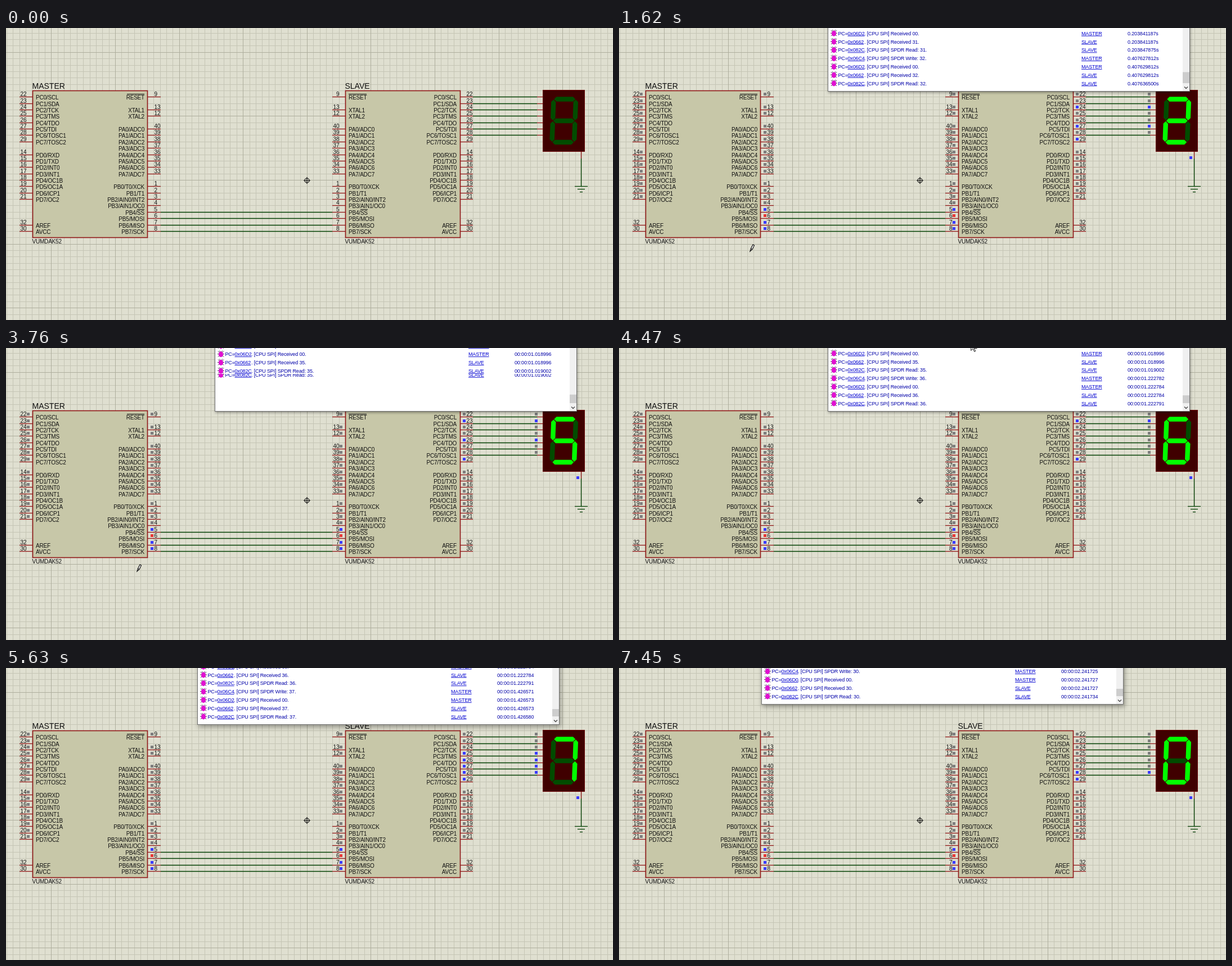
Recreate the animation shown at these times as an HTML page. Size 1079 by 519 pixels, loop 7.71 s.

```html
<!DOCTYPE html>
<html lang="en">
<head>
<meta charset="utf-8">
<title>SPI master and slave</title>
<style>
  html, body { margin: 0; width: 100%; height: 100%; overflow: hidden; background: #dfdfd0; }
  svg { display: block; }
  text { font-family: "Liberation Sans", Arial, sans-serif; font-size: 10px; letter-spacing: -.2px; fill: #111; }
  .num { letter-spacing: 0; }
  .name { font-size: 14px; letter-spacing: 0; }
  #log text { font-size: 9px; letter-spacing: -.15px; fill: #0000a8; }
  #log .link { fill: #0000d0; text-decoration: underline; }
  .crisp { shape-rendering: crispEdges; }
</style>
</head>
<body>
<svg id="stage" width="1079" height="519" viewBox="0 0 1079 519">
  <g id="grid" class="crisp"></g>
  <g id="board"></g>
  <g id="probes" class="crisp"></g>
  <g id="win">
    <rect id="frame" x="371.5" y="-200.5" width="643" height="313" fill="#fff" stroke="#6c6c6c"/>
    <g id="log"></g>
    <rect x="1002" y="-200" width="12" height="312" fill="#f0f0f0"/>
    <rect id="thumb" x="1002" width="12" fill="#cdcdcd"/>
    <path d="M1005 104.500l3 3 3-3" fill="none" stroke="#505050" stroke-width="1.500"/>
  </g>
  <g id="cursor">
    <path id="pencil" d="M0 0l1.500-5L5-12l2.500 1.300L4-3.500z M1.500-5L4-3.500" fill="#fff" stroke="#111" stroke-width="1.200"/>
    <path id="arrow" d="M0 0v15l3.500-3.500 2.500 5.500 2-1-2.500-5h5z" fill="#fff" stroke="#111"/>
  </g>
</svg>
<script>
const LOOP = 7710;
const RED = '#8f1616', GREEN = '#003f00';
const GRAY = '#7e7e7e', BLUE = '#3c3cff', HIGH = '#e83838';
const $ = id => document.getElementById(id);

function add(parent, tag, attrs, text) {
  const el = document.createElementNS('http://www.w3.org/2000/svg', tag);
  for (const k in attrs) el.setAttribute(k, attrs[k]);
  if (text !== undefined) el.textContent = text;
  parent.appendChild(el);
  return el;
}
const board = $('board');
const line = (x1, y1, x2, y2, stroke, w = 1.3, parent = board) =>
  add(parent, 'line', { x1, y1, x2, y2, stroke, 'stroke-width': w });
const label = (x, y, s, anchor = 'start', cls = '') =>
  add(board, 'text', { x, y, 'text-anchor': anchor, class: cls }, s);
const probe = (x, y, fill = GRAY) =>
  add($('probes'), 'rect', { x: x - 2.5, y: y - 2.5, width: 5, height: 5, fill });

// Grid around the origin mark; pin rows sit on its lines
const OX = 535, OY = 271, PITCH = 11.36;
const gridX = i => Math.floor(OX + .3 + i * PITCH) + .5;
const gridY = i => Math.floor(OY - .5 + i * PITCH) + .5;
const rowY = r => gridY(r - 13);
for (const major of [false, true]) {
  for (let i = -50; i <= 50; i++) {
    if ((i % 10 === 0) !== major) continue;
    const c = major ? '#aeae9d' : '#c5c5b5';
    line(gridX(i), 0, gridX(i), 519, c, 1, $('grid'));
    line(0, gridY(i), 1079, gridY(i), c, 1, $('grid'));
  }
}
add(board, 'path', {
  d: `M${OX - 6} ${OY}h12M${OX} ${OY - 6}v12M${OX - 4} ${OY}a4 4 0 1 0 8 0a4 4 0 1 0-8 0`,
  fill: 'none', stroke: '#111', 'stroke-width': 1.2
});

// Pins: [row, number, label]
const portC = ['SCL', 'SDA', 'TCK', 'TMS', 'TDO', 'TDI', 'TOSC1', 'TOSC2'];
const portD = ['RXD', 'TXD', 'INT0', 'INT1', 'OC1B', 'OC1A', 'ICP1', 'OC2'];
const portB = ['T0/XCK', 'T1', 'AIN0/INT2', 'AIN1/OC0', 'SS', 'MOSI', 'MISO', 'SCK'];
const sideCD = [
  ...portC.map((s, i) => [i, 22 + i, `PC${i}/${s}`]),
  ...portD.map((s, i) => [9 + i, 14 + i, `PD${i}/${s}`]),
  [20, 32, 'AREF'], [21, 30, 'AVCC']
];
const sideAB = [
  [0, 9, 'RESET'], [2, 13, 'XTAL1'], [3, 12, 'XTAL2'],
  ...portC.map((_, i) => [5 + i, 40 - i, `PA${i}/ADC${i}`]),
  ...portB.map((s, i) => [14 + i, 1 + i, `PB${i}/${s}`])
];
const bus = { 18: BLUE, 19: HIGH, 20: BLUE, 21: BLUE };
const misoProbes = [], outProbes = portC.map(() => []);

function pins(list, x, dir, isPortC) {
  for (const [r, n, s] of list) {
    const y = rowY(r), left = dir < 0;
    line(x, y, x + 23 * dir, y, RED);
    label(left ? x - 10.5 : x + 11.5, y - 1.5, n, left ? 'end' : 'start', 'num');
    label(left ? x + 6 : x - 6, y + 4, s, left ? 'start' : 'end');
    if (s[0] === 'A') continue;
    const p = probe(x + 7.5 * dir, y - 5, (list === sideAB && bus[r]) || GRAY);
    if (list === sideAB && r === 20) misoProbes.push(p);
    if (isPortC && r < 8) outProbes[r].push(p);
  }
}
function chip(x, name) {
  add(board, 'rect', { x: x + .5, y: 111.5, width: 204, height: 261, fill: '#c7c7a8', stroke: RED, 'stroke-width': 1.6 });
  label(x - .5, 108, name, 'start', 'name');
  label(x - .5, 382.5, 'VUMDAK52');
}
chip(47, 'MASTER');
pins(sideCD, 47, -1, false);
pins(sideAB, 252, 1, false);
line(215, 117.5, 246, 117.5, '#111', 1);
line(233, 322.5, 246, 322.5, '#111', 1);
chip(603, 'SLAVE');
pins(sideAB, 603, -1, false);
pins(sideCD, 807, 1, true);
line(609, 117.5, 641, 117.5, '#111', 1);
line(630, 322.5, 643, 322.5, '#111', 1);

// Wires
for (let r = 18; r < 22; r++) line(275, rowY(r), 580, rowY(r), GREEN);
for (let r = 0; r < 7; r++) {
  const y = rowY(r);
  line(830, y, 944, y, GREEN);
  line(944, y, 955, y, RED);
  outProbes[r].push(probe(942.5, y - 5));
}
line(1022.5, 220, 1022.5, 232, RED);
line(1022.5, 232, 1022.5, 282, GREEN);
line(1011, 281.5, 1034, 281.5, GREEN);
line(1016, 286.5, 1029, 286.5, GREEN);
line(1020, 291.5, 1025, 291.5, GREEN);
probe(1016.5, 230.5, BLUE);

// Seven segment display, segments a to g
add(board, 'rect', { x: 954.5, y: 110.5, width: 74, height: 109, fill: '#400000', stroke: '#6a0808' });
const TL = [973.5, 126.5], TR = [1013, 126.5], ML = [972, 165], MR = [1011.5, 165], BL = [970.5, 203], BR = [1010, 203];
const segs = [[TL, TR], [TR, MR], [MR, BR], [BL, BR], [ML, BL], [TL, ML], [ML, MR]].map(([p, q]) => {
  const dx = q[0] - p[0], dy = q[1] - p[1], len = Math.hypot(dx, dy), ux = dx / len, uy = dy / len;
  const at = (d, n) => [p[0] + ux * d - uy * n, p[1] + uy * d + ux * n].join();
  const h = 4.2;
  return add(board, 'polygon', {
    points: [at(.8, 0), at(h + .8, h), at(len - h - .8, h), at(len - .8, 0), at(len - h - .8, -h), at(h + .8, -h)].join(' ')
  });
});
const lit = ['abcdef', 'bc', 'abdeg', 'abcdg', 'bcfg', 'acdfg', 'acdefg', 'abc', 'abcdefg', 'abcdfg'];

// Log entries: [address, message, device, time]
const entries = [
  ['0714', 'SPI Enabled.', 'MASTER', 41250e-9], ['0718', 'Mode: Master.', 'MASTER', 41500e-9],
  ['07BC', 'SPI Enabled.', 'SLAVE', 62375e-9], ['07C2', 'Mode: Slave.', 'SLAVE', 62625e-9],
  ['07C8', 'Interrupt Enabled.', 'SLAVE', 62875e-9],
  ['07D4', 'SPDR Read: 00.', 'SLAVE', 63313e-9], ['07D8', 'SPDR Write: 00.', 'SLAVE', 63500e-9]
];
[...'123456789A0'].forEach((c, i) => {
  const t = .203839187 + i * .203788625;
  entries.push(
    ['06C4', `SPDR Write: 3${c}.`, 'MASTER', t],
    [c === '0' ? '06D0' : '06D2', 'Received 00.', 'MASTER', t + 2e-6],
    ['0662', `Received 3${c}.`, 'SLAVE', t + 2e-6],
    ['082C', `SPDR Read: 3${c}.`, 'SLAVE', t + 8.688e-6]);
});
const clock = t => t < 1 ? t.toFixed(9) + 's' : '00:00:0' + t.toFixed(6);

// [time, entries logged, blank rows below, digit]
const steps = [
  [0, 0, 0, -1], [90, 7, 0, -1], [650, 7, 3, -1], [670, 11, 0, 1],
  [1250, 11, 3, 1], [1270, 14, 0, 2], [1620, 15, 0, 2],
  [1850, 15, 3, 2], [1870, 18, 0, 3], [1890, 19, 0, 3],
  [2600, 19, 3, 3], [2620, 23, 0, 4], [3140, 23, 3, 4], [3160, 27, 0, 5],
  [3760, 27, 3.9, 5], [3780, 31, 0, 6],
  [4720, 31, 3, 6], [4740, 34, 0, 7], [4760, 35, 0, 7], [5690, 39, 0, 8],
  [6280, 39, 3, 8], [6300, 43, 0, 9], [6820, 43, 3, 9], [6840, 47, 0, 9],
  [7430, 47, 3, 9], [7450, 51, 0, 0]
];

function logRow([addr, msg, dev, time], y) {
  const g = add($('log'), 'g', { transform: `translate(0 ${y})` });
  add(g, 'path', { d: 'M377-5l10 10M387-5l-10 10M376 0h12M379-6l3 3 3-3', stroke: '#402050', fill: 'none' });
  add(g, 'ellipse', { cx: 382, cy: .5, rx: 4, ry: 5, fill: '#e010d0' });
  const put = (x, s, cls = '') => add(g, 'text', { x, y: 3.5, class: cls }, s);
  put(389.5, 'PC=');
  put(406.5, '0x' + addr, 'link');
  put(436, '. [CPU SPI] ' + msg);
  put(822, dev, 'link');
  put(904, clock(time));
}

function showLog(n, blank) {
  $('log').replaceChildren();
  const bottom = 98 - 14.8 * blank;
  if (blank % 1) {  // half-painted row left behind by the scroll
    logRow(entries[n - 1], bottom + 7);
    add($('log'), 'rect', { x: 374, y: 0, width: 626, height: 46, fill: '#fff' });
  }
  for (let i = Math.max(0, n - 8); i < n; i++) logRow(entries[i], bottom - 14.8 * (n - 1 - i));
  const top = Math.min(85, 73 + n * .36);
  $('thumb').setAttribute('y', top);
  $('thumb').setAttribute('height', 98 - top);
}

function showDigit(d) {
  segs.forEach((s, i) => {
    const on = d >= 0 && lit[d].includes('abcdefg'[i]);
    s.setAttribute('fill', on ? '#00ff00' : '#004c00');
    outProbes[i].forEach(p => p.setAttribute('fill', on ? GRAY : BLUE));
  });
  outProbes[7][0].setAttribute('fill', BLUE);
  misoProbes.forEach(p => p.setAttribute('fill', d === 1 ? HIGH : BLUE));
}

const clamp = v => Math.max(0, Math.min(1, v));
const ease = p => p * p * (3 - 2 * p);
const show = (el, on) => el.setAttribute('visibility', on ? 'visible' : 'hidden');
let current;

function draw(t) {
  const step = steps.findLast(s => s[0] <= t);
  if (step !== current) {
    current = step;
    showLog(step[1], step[2]);
    showDigit(step[3]);
  }
  const running = t >= 50;
  $('win').style.display = $('probes').style.display = running ? '' : 'none';

  const drag = t < 5530 ? 0 : ease(clamp((Math.floor((t - 5530) / 48) + 1) / 9));
  $('win').setAttribute('transform', `translate(${Math.round(-118 * drag)} ${Math.round(-48 * drag)})`);
  $('frame').style.filter = `drop-shadow(${t < 5300 ? '1px 2px 2px' : '2px 4px 4px'} rgba(0,0,0,.35))`;

  const p = ease(clamp(Math.floor((t - 3760) / 30) / 25));
  const x = 233 + 400 * p, y = 397 - 415 * p;
  $('cursor').setAttribute('transform', `translate(${x} ${y})`);
  const visible = running && t < 4520;
  show($('pencil'), visible && y > 113);
  show($('arrow'), visible && y <= 113);
}

const start = performance.now();
function tick() {
  draw((performance.now() - start) % LOOP);
  requestAnimationFrame(tick);
}
tick();
</script>
</body>
</html>
```
